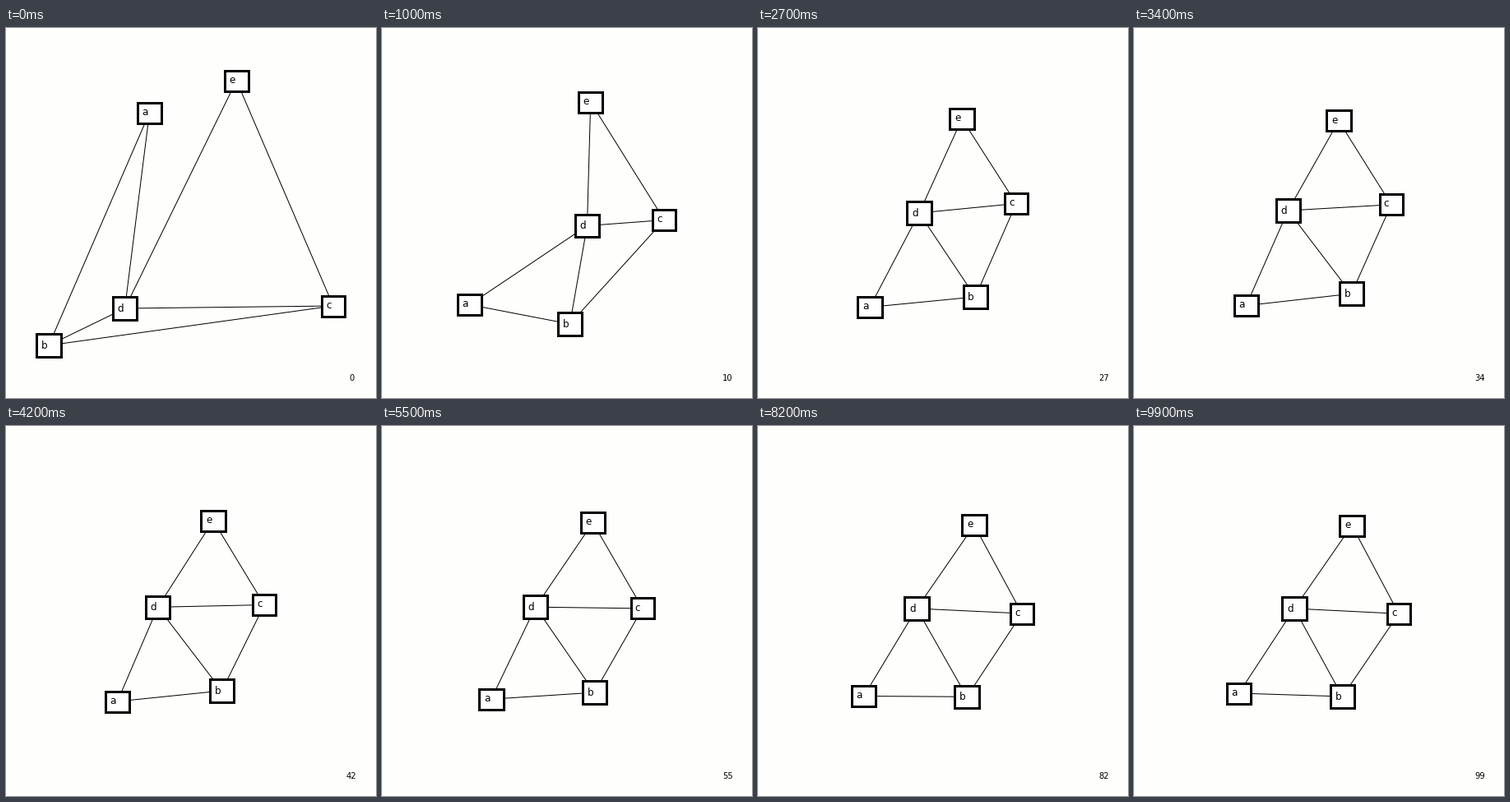
Recreate the animation shown at these times as a matplotlib script. Size 450 px wide and 450 px high, loop 10000 ms.

```python
import numpy as np
import matplotlib.pyplot as plt
from matplotlib.animation import FuncAnimation
from matplotlib.patches import Rectangle

SIZE, DPI, FRAMES, STEP = 450, 100, 100, 100
PX = 72 / DPI
NAMES = "abcde"
EDGES = ["ab", "ad", "bd", "bc", "cd", "de", "ce"]

# Node centres (a to e, x then y) as the layout settles.
TIMES = np.array([0, 10, 27, 42, 67, 82, 99], float)
POINTS = np.array([
    [174.5, 103, 52, 386, 398, 338, 144.5, 341, 280.3, 64],
    [106.5, 336.5, 228.5, 360, 343.3, 233.5, 249.5, 240.5, 253.7, 90],
    [136, 339.5, 264.3, 327, 314, 213.5, 196, 225, 248, 110.5],
    [135.5, 335, 262.5, 322, 314.2, 217.5, 184.7, 220.3, 252, 115],
    [130.5, 330.5, 255.5, 327, 319.3, 225, 189.7, 221, 260, 119.3],
    [128.7, 328.5, 254, 329.3, 321, 228, 193, 222, 263, 120.7],
    [127.5, 325, 253.5, 329, 322, 228.3, 195, 222, 265, 121],
])

# Speeds in px per frame: a strong pull first, then a slow drift.
SPEEDS = np.gradient(POINTS, TIMES, axis=0)
SPEEDS[0] = (POINTS[1] - POINTS[0]) * 0.2
SPEEDS[1] = [4, 1, 5.7, -5.3, -4.5, -3, -7, -2.5, -1.5, 2.8]
SPEEDS[2] = [0.2, -0.2, 0.2, -0.8, -0.5, 0.1, -1.8, -0.5, -0.1, 0.42]
SPEEDS[3] = [-0.15, -0.3, -0.3, 0, 0.15, 0.4, 0, -0.1, 0.35, 0.22]


def layout(t):
    """Cubic Hermite position of every node at time t (in frames)."""
    i = min(np.searchsorted(TIMES, t, side="right") - 1, len(TIMES) - 2)
    span = TIMES[i + 1] - TIMES[i]
    s = (t - TIMES[i]) / span
    ease = s * s * (3 - 2 * s)
    pos = (POINTS[i] * (1 - ease) + POINTS[i + 1] * ease
           + span * s * (1 - s) * ((1 - s) * SPEEDS[i] - s * SPEEDS[i + 1]))
    return dict(zip(NAMES, pos.reshape(-1, 2)))


fig = plt.figure(figsize=(SIZE / DPI, SIZE / DPI), dpi=DPI, facecolor="#fefefc")
ax = fig.add_axes([0, 0, 1, 1])
ax.set(xlim=(0, SIZE), ylim=(SIZE, 0))
ax.axis("off")


def label(text, px, **kw):
    return ax.text(0, 0, text, family="DejaVu Sans", size=px * PX,
                   color="black", va="baseline", zorder=3, **kw)


lines = {e: ax.plot([], [], color="black", lw=PX, zorder=1)[0] for e in EDGES}
boxes, labels = {}, {}
for n in NAMES:
    w = 28 if n == "c" else 29.5
    h = 27.5 if n in "bd" else 25
    boxes[n] = ax.add_patch(Rectangle((0, 0), w, h, fc="white", ec="black",
                                      lw=3 * PX, joinstyle="miter", zorder=2))
    labels[n] = label(n, 12, ha="left")
counter = label("0", 10, ha="center")
counter.set_position((420.3, 429))


def draw(frame):
    pos = layout(frame)
    for e, line in lines.items():
        line.set_data(*zip(pos[e[0]], pos[e[1]]))
    for n, (x, y) in pos.items():
        box = boxes[n]
        box.set_xy((x - box.get_width() / 2, y - box.get_height() / 2))
        labels[n].set_position((x - 9, y + (4 if n in "bd" else 2.6)))
    counter.set_text(str(frame))
    return [*lines.values(), *boxes.values(), *labels.values(), counter]


anim = FuncAnimation(fig, draw, frames=FRAMES, interval=STEP, repeat=True,
                     repeat_delay=0)
plt.show()
```
